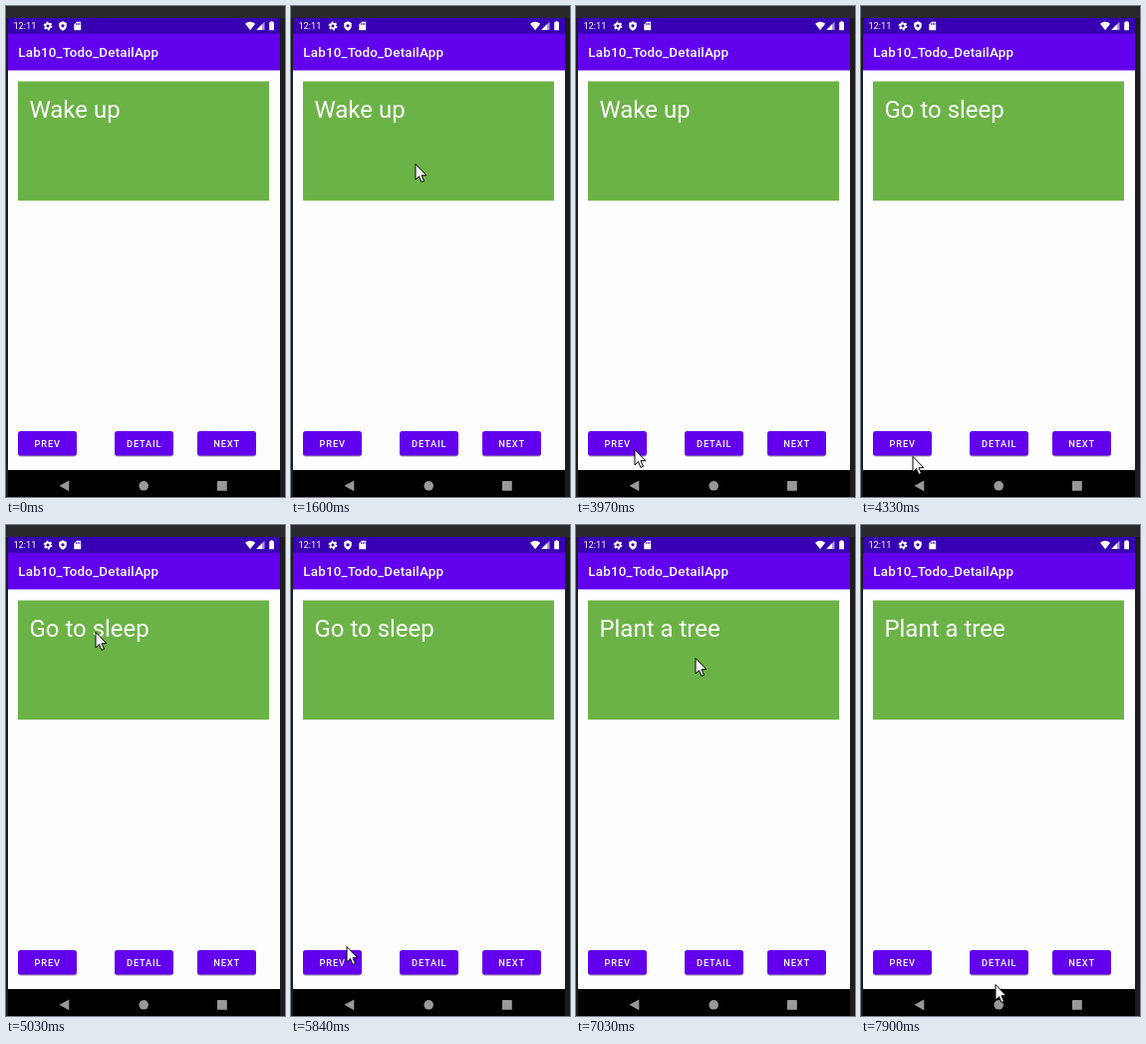
Recreate the animation shown at these times as an HTML page. Size 280 by 492 pixels, loop 8 s.

```html
<!DOCTYPE html>
<html lang="en">
<head>
<meta charset="utf-8">
<title>Todo detail</title>
<style>
  html, body { margin: 0; width: 100%; height: 100%; overflow: hidden; background: #1c1c1e; }
  svg { display: block; width: 280px; height: 492px; font-family: Roboto, sans-serif; fill: #fff; }
  .button rect { fill: #6200ee; filter: drop-shadow(0 1px .7px #0006); }
  .button.pressed rect { fill: #8133f1; }
  .button text { font-size: 9.3px; font-weight: 500; letter-spacing: .0892em; text-anchor: middle; }
</style>
</head>
<body>
<svg viewBox="0 0 280 492">
  <!-- emulator frame -->
  <rect width="280" height="492" fill="#1c1c1e"/>
  <rect width="280" height="12" fill="#29292b"/>

  <!-- screen -->
  <rect x="2" y="12" width="273" height="480" fill="#fefefe"/>
  <rect x="2" y="12" width="273" height="16" fill="#3700b3"/>
  <rect x="2" y="28" width="273" height="36.5" fill="#6200ee"/>
  <rect x="2" y="465" width="273" height="27" fill="#000"/>

  <!-- status bar -->
  <text x="7.4" y="23.4" font-size="9.3">12:11</text>
  <g fill="none" stroke="#fff">
    <circle cx="42" cy="20" r="2.4" stroke-width="1.8"/>
    <circle cx="42" cy="20" r="3.8" stroke-width="1.2" stroke-dasharray="1.99"/>
  </g>
  <path d="M57 15.3L60.8 17V20Q60.6 23.3 57 24.8Q53.4 23.3 53.2 20V17Z"/>
  <circle cx="57" cy="19.8" r="1.6" fill="#3700b3"/>
  <path d="M71 15.7H75.2V24.3H68.3V18.4Z"/>
  <path d="M70.6 17.2V19M72.2 17V19M73.8 17V19" stroke="#3700b3" stroke-width=".8"/>
  <path d="M240 17.8Q245.1 13.6 250.2 17.8L245.1 24.2Z"/>
  <path d="M251.3 24L259.5 15.7V24Z" fill="#fff9"/>
  <path d="M251.3 24L257 18.3V24Z"/>
  <path d="M265.5 15.3H267.7V16.2H269V24.3H264.2V16.2H265.5Z"/>

  <text x="12.3" y="51.3" font-size="13.4" font-weight="500" letter-spacing=".19">Lab10_Todo_DetailApp</text>
  <rect x="12" y="75.5" width="252" height="119.5" fill="#6bb346"/>
  <text id="todo" x="23.4" y="111.6" font-size="24"></text>

  <g id="buttons"></g>

  <!-- navigation bar -->
  <g fill="#999">
    <path d="M53.5 480.8L63.3 475.4V486.2Z"/>
    <circle cx="138.2" cy="480.8" r="4.8"/>
    <rect x="212" y="476" width="9.8" height="9.8" rx=".6"/>
  </g>

  <path id="cursor" d="M0 .5V16L3.5 12.6L6 18.4L8.5 17.3L6 11.7H10.9Z" stroke="#000" stroke-linejoin="round"/>
</svg>
<script>
  const DURATION = 8000;
  const SAMPLE = 137; // the pointer moves in steps of about this many ms
  const [todo, buttons, cursor] = ['todo', 'buttons', 'cursor'].map(id => document.getElementById(id));

  const button = (label, x) => `<g class="button">
    <rect x="${x}" y="426" width="59" height="24.5" rx="2.7"/>
    <text x="${x + 29.7}" y="442">${label}</text></g>`;
  buttons.innerHTML = button('PREV', 12) + button('DETAIL', 109) + button('NEXT', 192);
  const prev = buttons.firstElementChild;

  // Turning points of the pointer; a key without a position hides it.
  const keys = [
    { time: 0 },
    { time: 760, at: [66, 269] },
    { time: 1310, at: [103, 128] },
    { time: 1600, at: [125, 158] },
    { time: 1850, at: [147, 262] },
    { time: 2110, at: [86, 386] },
    { time: 2230 },
    { time: 2980, at: [26, 460] },
    { time: 3500, at: [66, 437] },
    { time: 4330, at: [52, 451] },
    { time: 5030, at: [90, 107] },
    { time: 5560, at: [72, 474] },
    { time: 5840, at: [56, 422] },
    { time: 6220, at: [56, 422] },
    { time: 7030, at: [120, 133] },
    { time: 7610, at: [140, 474] },
    { time: 7900, at: [135, 460] }
  ];

  const ease = p => (1 - Math.cos(Math.PI * p)) / 2;
  const within = (t, start, end) => t >= start && t < end;

  function pointerAt(t) {
    const i = keys.findLastIndex(key => key.time <= t);
    const from = keys[i], to = keys[i + 1];
    if (!from.at || !to?.at) return from.at;
    const span = to.time - from.time;
    const steps = Math.round(span / SAMPLE);
    const p = ease(Math.floor((t - from.time) / span * steps) / steps);
    return from.at.map((start, axis) => Math.round(start + (to.at[axis] - start) * p));
  }

  function draw(t) {
    const point = pointerAt(t);
    cursor.style.display = point ? '' : 'none';
    if (point) cursor.setAttribute('transform', `translate(${point})`);
    todo.textContent = t < 4210 ? 'Wake up' : t < 6360 ? 'Go to sleep' : 'Plant a tree';
    prev.classList.toggle('pressed', within(t, 4090, 4330) || within(t, 6220, 6490));
  }

  const origin = performance.now();
  function tick() {
    draw((performance.now() - origin) % DURATION);
    requestAnimationFrame(tick);
  }
  tick();
</script>
</body>
</html>
```
